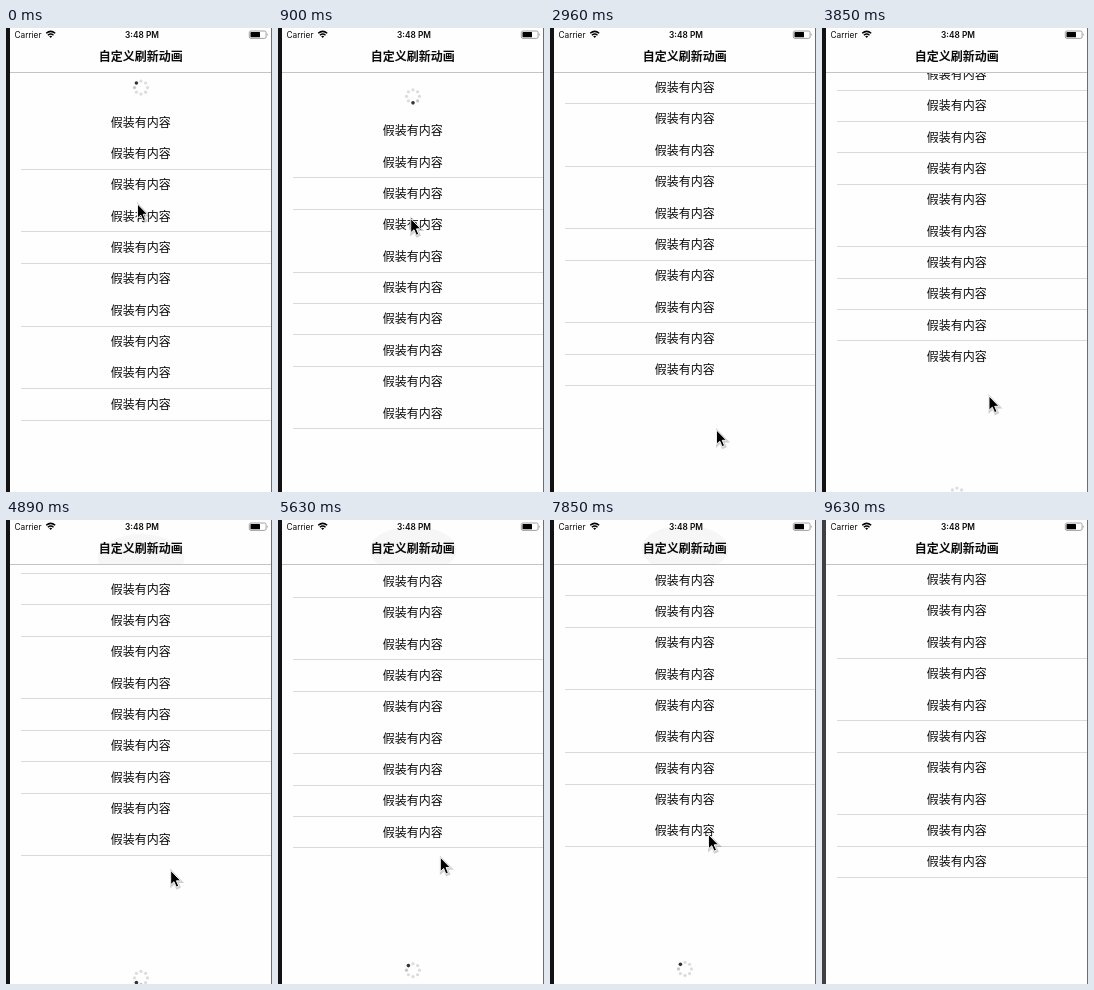
Animation, 266 px wide and 464 px high, one loop 9.73 s. Source, as an HTML page:

```html
<!DOCTYPE html>
<html lang="zh">
<head>
<meta charset="utf-8">
<style>
html, body { margin: 0; width: 100%; height: 100%; overflow: hidden; background: #fefefe; }
svg { display: block; width: 266px; height: 464px; }
text { font-family: "Noto Sans CJK SC", "Noto Sans CJK", sans-serif; font-size: 12px; text-anchor: middle; fill: #0a0a0a; }
.title { font-weight: 700; }
.status { font-family: Inter, sans-serif; font-size: 8.3px; }
.clock { font-weight: 600; }
</style>
</head>
<body>
<svg viewBox="0 0 266 464">
  <defs><clipPath id="bar"><rect x="4" width="261" height="44"/></clipPath></defs>
  <rect width="266" height="464" fill="#fefefe"/>
  <g id="list"></g>
  <g id="lines" fill="#dadada"></g>
  <g id="head"></g>
  <g id="foot"></g>
  <rect x="4" width="261" height="44" fill="#fefefe"/>
  <g clip-path="url(#bar)"><ellipse id="haze" cx="135" rx="43.5" ry="23.5" fill="#f6f6f6"/></g>
  <rect x="4" y="44" width="261" height="1" fill="#c4c4c4"/>
  <text class="title" x="134.7" y="33.3">自定义刷新动画</text>
  <text class="status" x="22" y="9.6">Carrier</text>
  <text class="status clock" x="136" y="9.6">3:48 PM</text>
  <g fill="none" stroke="#000" stroke-width="1.5">
    <path d="M40.2 5.3Q44.7 1.4 49.2 5.3M41.9 7.2Q44.7 4.8 47.5 7.2"/>
    <path d="M43.2 8.3L44.7 10L46.2 8.3Q44.7 7.2 43.2 8.3Z" fill="#000" stroke="none"/>
  </g>
  <rect x="243.3" y="3" width="16.8" height="7.4" rx="1.6" fill="#fff" stroke="#8a8a8a" stroke-width=".8"/>
  <rect x="244.5" y="4.1" width="9.5" height="5.2" rx=".6" fill="#000"/>
  <path d="M261.2 5.4Q262.8 6.7 261.2 8Z" fill="#8a8a8a"/>
  <rect id="edge" width="4" height="464"/>
  <rect x="265" width="1" height="464" fill="#6e6e6e"/>
  <g id="cursor">
    <path d="M0 0V14.2L3.3 11.2L5.6 16.6L8 15.6L5.7 10.3H10Z" transform="translate(.7 1)" fill="none" stroke="#000" stroke-opacity=".18" stroke-width="2.4"/>
    <path d="M0 0V14.2L3.3 11.2L5.6 16.6L8 15.6L5.7 10.3H10Z" stroke="#fff" stroke-width=".9"/>
  </g>
</svg>
<script>
const LOOP = 9730, STEP = 148.15, PITCH = 31.36, ROWS = 10;
const REST = 44.02, HEAD = 37.8, FOOT = 30.8;
const $ = id => document.getElementById(id);

function add(parent, tag, attrs) {
  const el = document.createElementNS('http://www.w3.org/2000/svg', tag);
  for (const k in attrs) el.setAttribute(k, attrs[k]);
  return parent.appendChild(el);
}

const ease = {
  lin: p => p,
  out: p => 1 - (1 - p) ** 3,
  both: p => p * p * (3 - 2 * p)
};

// time, values..., easing of the segment that ends here
const LIST = [
  [0, 78.5], [600, 85], [1080, 87.4, 'out'], [1500, 81.89, 'out'],
  [2440, 81.89], [2960, REST, 'both'], [3450, REST], [3852, 30.74, 'both'],
  [4889, 22.13], [5780, 12.8], [6519, 7.62], [6650, 7.5], [7050, 13.17, 'out'],
  [8060, 13.17], [8400, REST, 'both']
];
const POINTER = [
  [0, 131.5, 176], [1100, 133, 194], [1260, 133, 194], [2320, 167, 400, 'both'],
  [2500, 167, 400], [2960, 166.5, 402], [3450, 166.5, 402], [3852, 167, 368, 'both'],
  [4889, 164.7, 350.5], [6519, 159.5, 321.5], [6900, 158.5, 314.5, 'out'],
  [8200, 158.5, 314.5], [9150, 155, 470, 'both']
];

function track(keys, t, i = 1) {
  const n = keys.findIndex(k => k[0] > t);
  if (n < 0) return keys[keys.length - 1][i];
  const a = keys[n - 1], b = keys[n], last = b[b.length - 1];
  const f = ease[last] || ease.lin;
  return a[i] + (b[i] - a[i]) * f((t - a[0]) / (b[0] - a[0]));
}

const lines = [];
for (let i = 0; i < ROWS; i++) {
  add($('list'), 'text', { x: 134.7, y: 20.1 + PITCH * i }).textContent = '假装有内容';
  lines.push(add($('lines'), 'rect', { x: 15, width: 250, height: 1 }));
}

function makeSpinner(group) {
  return Array.from({ length: 8 }, (_, i) => {
    const a = i * Math.PI / 4;
    return add(group, 'circle', { cx: 6.5 * Math.sin(a), cy: -6.5 * Math.cos(a) });
  });
}
const headDots = makeSpinner($('head')), footDots = makeSpinner($('foot'));

function drawSpinner(group, dots, y, pull, spin) {
  group.setAttribute('transform', `translate(135 ${y})`);
  group.style.display = pull > 0.01 ? '' : 'none';
  const lead = pull > 0.99 ? Math.floor(spin / 100) & 7 : Math.floor(8 * Math.max(0, pull));
  dots.forEach((d, i) => {
    const lag = (lead - i + 8) % 8;
    d.setAttribute('fill', ['#333', '#c6c6c6'][lag] || '#dcdcdc');
    d.setAttribute('r', lag ? 1.6 : 1.8);
  });
}

function draw(t) {
  const top = track(LIST, t);
  $('list').setAttribute('transform', `translate(0 ${top})`);
  // hairlines drop out at some subpixel phases
  lines.forEach((line, i) => {
    const phase = (top * 0.9985 + 0.51 + 0.39 * (i + 1)) % 1;
    line.setAttribute('y', Math.floor(top + PITCH * (i + 1)));
    line.style.display = phase < 0.31 ? 'none' : '';
  });

  drawSpinner($('head'), headDots, top - HEAD / 2, (top - REST) / HEAD, t - 420);
  drawSpinner($('foot'), footDots, top + 435.8, (REST - top) / FOOT, t - (t < 6700 ? 5960 : 6300));

  const row = top + 15.6;
  $('haze').setAttribute('cy', row);
  $('haze').style.display = row < 44 ? '' : 'none';

  $('cursor').setAttribute('transform', `translate(${track(POINTER, t, 1)} ${track(POINTER, t, 2)})`);
  $('edge').setAttribute('fill', t > 9600 ? '#404040' : '#121212');
}

const start = performance.now();
function tick() {
  const t = (performance.now() - start) % LOOP;
  draw(Math.floor((t + 10) / STEP) * STEP);
  requestAnimationFrame(tick);
}
tick();
</script>
</body>
</html>
```
